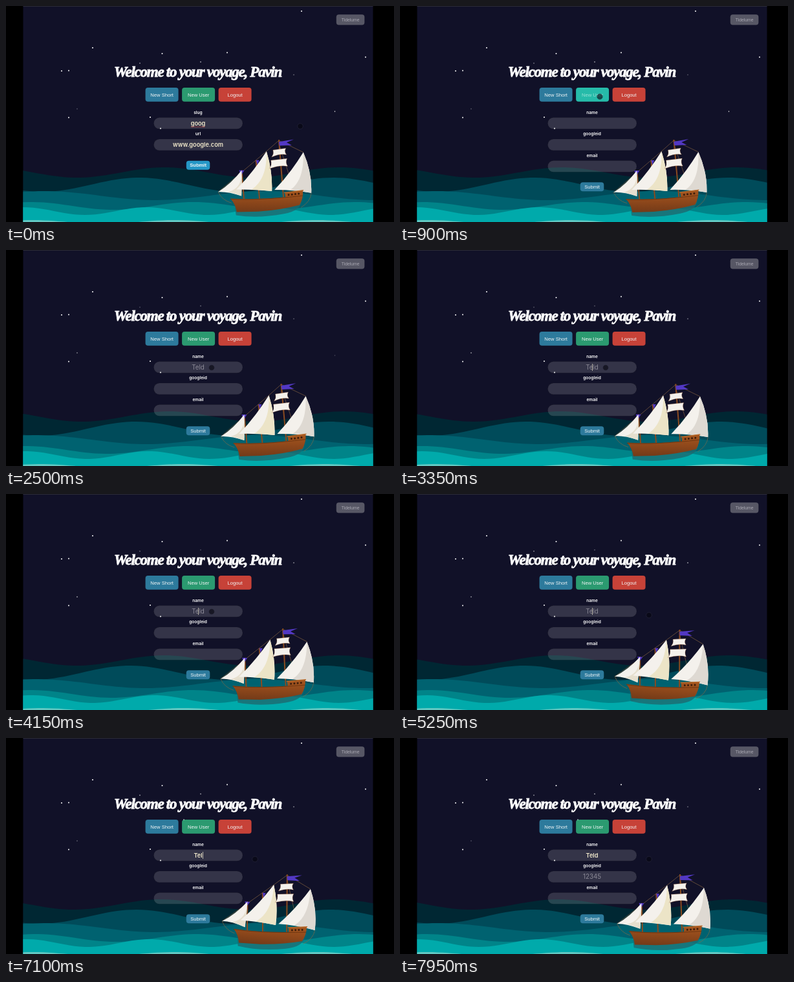
Animation, 600 px wide and 336 px high, one loop 8000 ms. Source, as an HTML page:

```html
<!DOCTYPE html>
<html lang="en">
<head>
<meta charset="utf-8">
<title>Voyage</title>
<style>
  html, body { margin: 0; width: 100%; height: 100%; overflow: hidden; background: #000; }
  svg { display: block; width: 600px; height: 336px; }
  text { text-anchor: middle; fill: #fff; }
  .title { font: italic bold 23px "Liberation Serif", "Noto Serif", serif; letter-spacing: -1.25px;
    stroke: #fff; stroke-width: .8px; }
  .btn text { font: 7.6px "Liberation Sans", Arial, sans-serif; fill: #f1f5f6; }
  .label { font: 600 6.6px Inter, "Open Sans", sans-serif; }
  .value { font: 600 9.2px Inter, "Open Sans", sans-serif; fill: #f3ebcd; }
  .hint { font-weight: 400; font-size: 9.8px; fill: #8b8996; }
  .field { fill: #fff; fill-opacity: .15; stroke: #000; stroke-opacity: .12; }
  .rope { fill: none; stroke: #8f6a43; stroke-width: .6; }
  .mast { fill: none; stroke: #8a4b20; stroke-width: 2; }
  .flag { fill: #5238c4; }
</style>
</head>
<body>
<svg viewBox="0 0 600 336" xmlns="http://www.w3.org/2000/svg">
  <defs>
    <clipPath id="page"><rect x="26.5" width="541" height="336"/></clipPath>
    <linearGradient id="hullFill" x2="0" y2="1">
      <stop stop-color="#a6571f"/><stop offset=".5" stop-color="#8f481b"/><stop offset="1" stop-color="#733a18"/>
    </linearGradient>
  </defs>
  <rect width="600" height="336"/>
  <g clip-path="url(#page)">
    <rect x="26" width="542" height="336" fill="#111128"/>
    <rect x="26" width="542" height="1" fill="#2b2b36"/>
    <g id="waves"></g>

    <g id="ship">
      <path class="rope" d="M421 209 L402 226 L328 290 M421 209 L459 227 M421 214 L446 288 M328 290 Q334 303 349 307 M472 290 Q471 304 456 313"/>
      <path class="mast" d="M421 208 L429 297 M386 240 L392 300 M364 256 L368 301"/>
      <path class="flag" d="M421 211 L444 207 L433 212 L441 216 L422 217Z M386 240 H391 L388 247Z M360 256 H368 L363 264Z"/>
      <g id="sails"></g>
      <path d="M354 314 Q400 314 457 303 Q456 318 430 323 Q390 331 356 326Z" fill="#1d6a70" opacity=".8"/>
      <path d="M347 300 Q388 302 432 297 L431 290 L459 286 Q460 299 454 309 Q426 317 390 320 L357 321 Q355 309 347 300Z" fill="url(#hullFill)"/>
      <path d="M347 301 Q390 303 459 294.500" fill="none" stroke="#6b3410" stroke-width=".9"/>
      <path d="M430 290 L460 286" stroke="#b86a2b" stroke-width="1.300"/>
    </g>

    <g id="menu"></g>
    <text class="title" x="296.500" y="109.500">Welcome to your voyage, Pavin</text>
    <g id="shortForm"></g>
    <g id="userForm"></g>
    <g id="stars" fill="#fff"></g>
    <circle id="cursor" r="4.300" fill="#05050f" fill-opacity=".62" stroke="#34334a" stroke-opacity=".55" stroke-width=".8"/>
  </g>
</svg>

<script>
const LOOP = 8000, STEP = 50, SWITCH = 850, FOCUS = 1700, TYPE = 6500, TAB = 7500;
const NAME = "Teld", MID = 297, TAU = 2 * Math.PI;
const $ = id => document.getElementById(id);
const ease = v => { v = Math.max(0, Math.min(1, v)); return v * v * (3 - 2 * v); };
const show = (el, on) => { el.style.display = on ? "" : "none"; };

function add(parent, tag, attrs, text) {
  const el = document.createElementNS("http://www.w3.org/2000/svg", tag);
  for (const k in attrs) el.setAttribute(k, attrs[k]);
  if (text) el.textContent = text;
  return parent.appendChild(el);
}

function button(parent, x, y, width, height, fill, label) {
  const g = add(parent, "g", { class: "btn" });
  const box = add(g, "rect", { x, y, width, height, rx: 4, fill });
  const text = add(g, "text", { x: x + width / 2, y: y + height / 2 + 2.6 }, label);
  return { box, text };
}

// Rows are evenly spaced; returns the text inside the input pill.
function field(parent, row, label, value) {
  const y = 173.5 + row * 33.5;
  add(parent, "text", { class: "label", x: MID, y: y - 5.8 }, label);
  add(parent, "rect", { class: "field", x: 228.5, y, width: 137.5, height: 17.8, rx: 8.9 });
  return add(parent, "text", { class: "value", x: MID, y: y + 12.2 }, value);
}

const submit = (parent, rows, fill) =>
  button(parent, 278.8, 173.8 + rows * 33.5, 36.5, 14, fill, "Submit");

const [, newUser] = [["New Short", "#2d7a9c"], ["New User", "#2b9a70"], ["Logout", "#c74238"]]
  .map(([label, fill], i) => button($("menu"), 215.6 + i * 56.5, 127, 51, 21.8, fill, label));
button($("menu"), 510.8, 13.3, 43.6, 16.2, "#575765", "Tidelume").text
  .style.cssText = "font-size:6.8px;fill:#a9a8b2";

["goog", "www.google.com"].forEach((v, i) => field($("shortForm"), i, ["slug", "url"][i], v));
add($("shortForm"), "path", { d: "M286 188 H308", stroke: "#d7453d", "stroke-width": .9, "stroke-dasharray": "1.2 .6" });
submit($("shortForm"), 2, "#2597c6").text.style.fontWeight = "bold";

const [nameText, idText] = ["name", "googleid", "email"].map((l, i) => field($("userForm"), i, l));
submit($("userForm"), 3, "#2d7a9c");
const caret = add($("userForm"), "rect", { y: 177, width: .8, height: 11, fill: "#d8d2bd" });

// Triangular sail: apex, left foot, right foot, with a shaded leeward side.
function sail(ax, ay, lx, ly, rx, ry, shade) {
  const mx = lx + (rx - lx) * .42, my = Math.min(ly, ry) - 1;
  const lee = `Q${mx} ${my} ${rx} ${ry} Q${rx + 1} ${(ay + ry) / 2} ${ax} ${ay}Z`;
  add($("sails"), "path", { fill: "#f4f1ec",
    d: `M${ax} ${ay} Q${(ax + lx) / 2 + 2} ${(ay + ly) / 2 + 4} ${lx} ${ly} ${lee}` });
  add($("sails"), "path", { fill: shade,
    d: `M${ax} ${ay} Q${ax + 2} ${ay + (ry - ay) * .7} ${mx} ${my + 1} ${lee}` });
}

// Square sail hanging from a slightly tilted yard.
function squareSail(x, y, w, h) {
  add($("sails"), "path", { fill: "#f4f1ec", stroke: "#8a4b20", "stroke-width": .3,
    d: `M${x} ${y} l${w} -3 q-3 ${h / 2} 1 ${h} q${-w / 2} -2 ${-w - 3} 4 q4 ${-h / 2} 2 ${-h - 1}Z` });
}

sail(364, 256, 328, 290, 364, 296, "#e6dfce");
sail(402, 226, 356, 286, 411, 288, "#ece4c7");
sail(459, 227, 415, 286, 472, 290, "#ded9d2");
squareSail(412, 224, 20, 10);
squareSail(409, 240, 25, 12);
for (let i = 0; i < 4; i++)
  add($("ship"), "circle", { cx: 437 + i * 5.2, cy: 293.5 - i * .7, r: 1.5, fill: "#3a1c0c" });

const stars = [
  [457, 8], [134, 65], [241.5, 74], [342, 72.5], [556, 79.5], [86, 101], [97, 100.5], [97, 173.5],
  [223, 173], [239, 190.5], [301, 87], [207, 89], [445, 107], [110, 160], [508.5, 164], [275, 127],
].map(([cx, cy], i) => add($("stars"), "circle", { cx, cy, r: i < 10 ? 1 : .75 }));

// The first ten stars are steady; 508 fades out early, 275 appears late, the rest twinkle.
function drawStars(t) {
  stars.slice(10).forEach((s, i) => s.setAttribute("opacity", .7 + .3 * Math.cos(TAU * t / LOOP + i)));
  stars[14].setAttribute("opacity", 1 - ease((t - 1200) / 2000));
  stars[15].setAttribute("opacity", ease((t - 5300) / 600));
}

const waves = [
  { fill: "#002733", level: 259, height: 8, length: 270, crest: 245 },
  { fill: "#004b5a", level: 278, height: 11, length: 300, crest: 206 },
  { fill: "#006270", level: 295, height: 7, length: 340, crest: 60 },
  { fill: "#008489", level: 311, height: 6, length: 250, crest: 290 },
  { fill: "#00aaab", level: 319, height: 6, length: 190, crest: 27 },
  { fill: "#62c8c2", level: 336, height: 3, length: 220, crest: 480 },
];
waves.forEach(w => { w.el = add($("waves"), "path", { fill: w.fill }); });

function drawWave(w, i, t) {
  const crest = w.crest + 8 * (Math.sin(TAU * t / LOOP + i) - Math.sin(i));
  let d = "M26 336";
  for (let x = 26; x <= 570; x += 8)
    d += `L${x} ${(w.level - w.height * Math.cos(TAU * (x - crest) / w.length)).toFixed(2)}`;
  w.el.setAttribute("d", d + "V336Z");
}

// A slow drift to the right with one roll per loop.
function drawShip(t) {
  const u = t / LOOP;
  const dx = 7 * u + 2.4 * Math.sin(TAU * u), dy = 3 * u ** 3;
  const tilt = 6.8 * Math.cos(Math.PI * (t - 6200) / 9100) ** 4;
  $("ship").setAttribute("transform", `translate(${dx} ${dy}) rotate(${tilt} 403 303)`);
}

const moves = [
  { from: 200, to: 850, x: 309, y: 141, lift: 50 },
  { from: 1050, to: 1550, x: 318, y: 183, lift: 0 },
  { from: 4500, to: 5050, x: 385, y: 188.5, lift: 0 },
];

function drawCursor(t) {
  let x = 455, y = 187;
  for (const m of moves) {
    const u = ease((t - m.from) / (m.to - m.from));
    x += (m.x - x) * u;
    y += (m.y - y) * u - m.lift * Math.sin(Math.PI * u);
  }
  $("cursor").setAttribute("transform", `translate(${x} ${y})`);
}

const blend = (a, b, u) => `rgb(${a.map((v, i) => Math.round(v + (b[i] - v) * u))})`;

function drawHover(t) {
  const u = ease((t - 730) / 170) * (1 - ease((t - 1150) / 250));
  newUser.box.setAttribute("fill", blend([43, 154, 112], [38, 187, 169], u));
  newUser.text.style.fill = blend([241, 245, 246], [150, 226, 214], u);
}

function setText(el, text, hint) {
  el.textContent = text;
  el.classList.toggle("hint", hint);
}

function drawForm(t) {
  show($("shortForm"), t < SWITCH);
  show($("userForm"), t >= SWITCH);

  const typed = NAME.slice(0, Math.max(0, Math.floor((t - TYPE) / 180)));
  const focused = t >= FOCUS, tabbed = t >= TAB;
  setText(nameText, typed || (focused ? NAME : ""), !typed);
  setText(idText, tabbed ? "12345" : "", true);

  show(caret, focused && t % 1000 < 500);
  const tail = typed && !tabbed ? nameText.getComputedTextLength() / 2 + .5 : 0;
  caret.setAttribute("transform", `translate(${MID + tail} ${tabbed ? 33.5 : 0})`);
}

function draw(t) {
  waves.forEach((w, i) => drawWave(w, i, t));
  [drawStars, drawShip, drawHover, drawForm, drawCursor].forEach(part => part(t));
}

const start = performance.now();
function tick() {
  const t = (performance.now() - start) % LOOP;
  draw(Math.floor(t / STEP) * STEP);
  requestAnimationFrame(tick);
}
tick();
</script>
</body>
</html>
```
